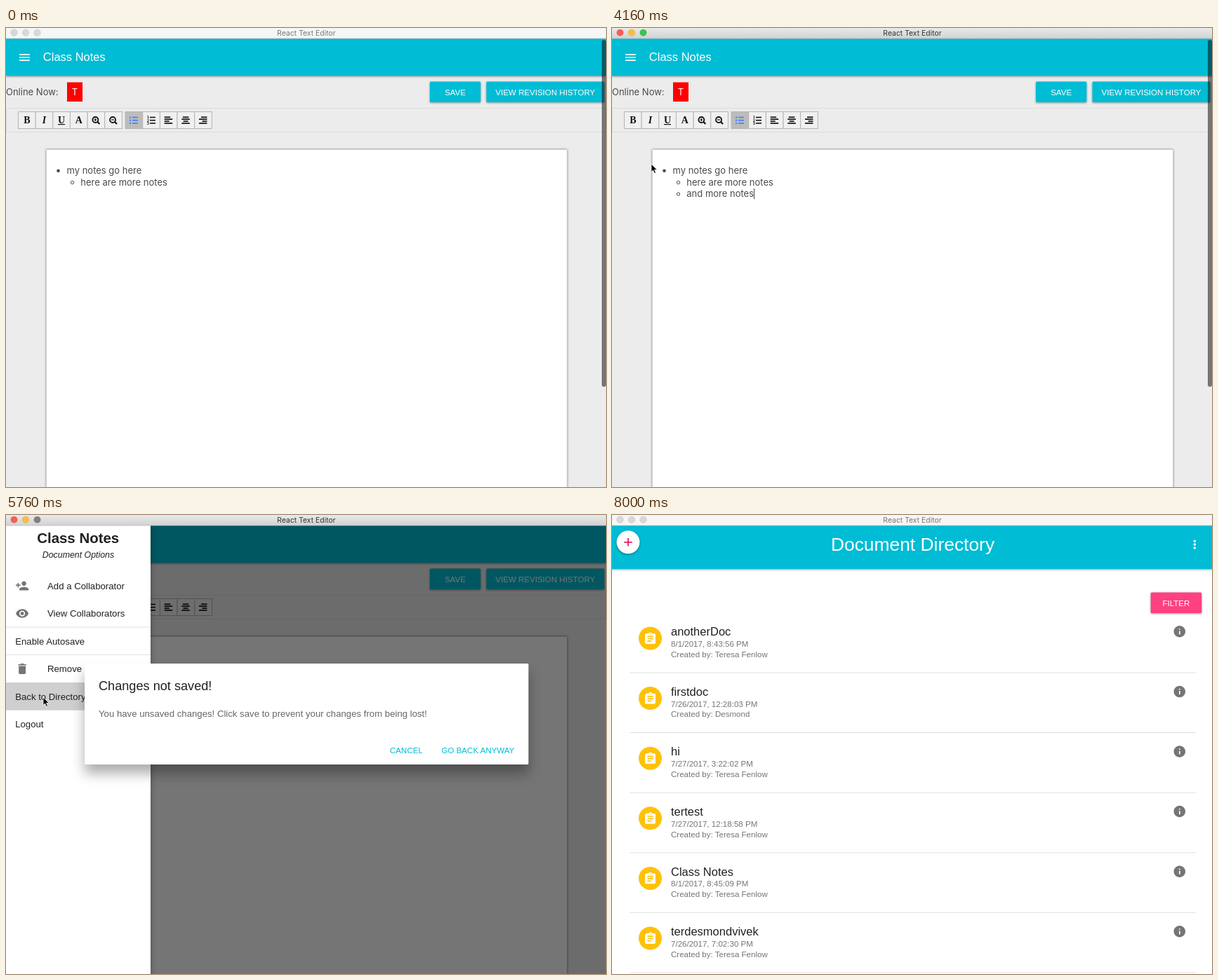
An HTML page for the animation above (8.08 s loop, 855 px wide and 655 px high).

```html
<!DOCTYPE html>
<html lang="en">
<head>
<meta charset="utf-8">
<title>Text Editor</title>
<style>
html, body { margin: 0; width: 100%; height: 100%; overflow: hidden; background: #ececec; }
svg { display: block; font-family: "Liberation Sans", Arial, sans-serif; }
text { white-space: pre; }
.ui { font-family: Inter, sans-serif; }
.serif { font-family: "Liberation Serif", "Noto Serif", serif; font-weight: bold; }
.mid { text-anchor: middle; }
.low { filter: drop-shadow(0 1px 1.5px rgba(0,0,0,.4)); }
.page { filter: drop-shadow(0 0 1.5px rgba(0,0,0,.65)); }
.side { filter: drop-shadow(0 2px 4px rgba(0,0,0,.35)); }
.high { filter: drop-shadow(0 13px 9px rgba(0,0,0,.32)); }
</style>
</head>
<body>
<svg id="stage" width="855" height="655" viewBox="0 0 855 655"></svg>
<script>
const LOOP = 8080, STEP = 80, CYAN = '#00bcd4', INK = '#212121';

const text = (x, y, size, fill, str, attrs = '') =>
  `<text x="${x}" y="${y}" font-size="${size}" fill="${fill}" ${attrs}>${str}</text>`;
const rect = (x, y, w, h, fill, attrs = '') =>
  `<rect x="${x}" y="${y}" width="${w}" height="${h}" fill="${fill}" ${attrs}/>`;
const circle = (x, y, r, fill, attrs = '') =>
  `<circle cx="${x}" cy="${y}" r="${r}" fill="${fill}" ${attrs}/>`;
const path = (d, attrs) => `<path d="${d}" ${attrs}/>`;
const icon = (cx, cy, d, fill) =>
  path(d, `fill="${fill}" transform="translate(${cx - 9.9} ${cy - 9.9}) scale(.825)"`);
const group = (id, body, attrs = '') => `<g id="${id}" ${attrs}>${body}</g>`;
const button = (x, y, w, fill, label) =>
  rect(x, y, w, 29.5, fill, 'rx="1.5" class="low"') +
  text(x + w / 2, y + 19, 11.55, '#fff', label, 'class="mid"');

const ICONS = {
  menu: 'M3 18h18v-2H3zM3 13h18v-2H3zM3 6v2h18V6z',
  addPerson: 'M15 12c2.21 0 4-1.79 4-4s-1.79-4-4-4-4 1.79-4 4 1.79 4 4 4zm-9-2V7H4v3H1v2h3v3h2v-3h3v-2H6zm9 4c-2.67 0-8 1.34-8 4v2h16v-2c0-2.66-5.33-4-8-4z',
  eye: 'M12 4.5C7 4.5 2.73 7.61 1 12c1.73 4.39 6 7.5 11 7.5s9.27-3.11 11-7.5c-1.73-4.39-6-7.5-11-7.5zM12 17c-2.76 0-5-2.24-5-5s2.24-5 5-5 5 2.24 5 5-2.24 5-5 5zm0-8c-1.66 0-3 1.34-3 3s1.34 3 3 3 3-1.34 3-3-1.34-3-3-3z',
  bin: 'M6 19c0 1.1.9 2 2 2h8c1.1 0 2-.9 2-2V7H6zM19 4h-3.5l-1-1h-5l-1 1H5v2h14z',
  clipboard: 'M19 3h-4.18C14.4 1.84 13.3 1 12 1c-1.3 0-2.4.84-2.82 2H5c-1.1 0-2 .9-2 2v14c0 1.1.9 2 2 2h14c1.1 0 2-.9 2-2V5c0-1.1-.9-2-2-2zm-7 0c.55 0 1 .45 1 1s-.45 1-1 1-1-.45-1-1 .45-1 1-1zm2 14H7v-2h7zm3-4H7v-2h10zm0-4H7V7h10z',
  info: 'M12 2C6.48 2 2 6.48 2 12s4.48 10 10 10 10-4.48 10-10S17.52 2 12 2zm1 15h-2v-6h2zm0-8h-2V7h2z'
};

function toolbar() {
  const slot = i => (i < 6 ? 17.5 : 22.2) + i * 24.65;
  let out = rect(.5, 114.5, 854, 34, '#ececec', 'stroke="#dcdcdc"');
  for (let i = 0; i < 11; i++)
    out += rect(slot(i), 119.5, 24.65, 24, i == 6 ? '#bcbcbc' : '#f0f0f0', 'stroke="#b4b4b4"');
  ['B', 'I', 'U', 'A'].forEach((c, i) => {
    const style = c == 'I' ? 'font-style="italic"' : '';
    out += text(slot(i) + 12.3, 136, 14, '#111', c, `class="serif mid" ${style}`);
  });
  out += rect(74, 137, 10, 1.2, '#111');
  [4, 5].forEach(i => {
    const x = slot(i) + 11.3;
    const sign = `M${x - 2} 131h4` + (i == 4 ? `M${x} 129v4` : '');
    out += circle(x, 131, 4, 'none', 'stroke="#111" stroke-width="1.8"') +
      path(`M${x + 3} 134l3 3`, 'stroke="#111" stroke-width="2.2"') +
      path(sign, 'stroke="#111" stroke-width="1.2"');
  });
  [127.5, 131.7, 135.9].forEach((y, i) => {
    out += rect(176, y - 1, 2.2, 2, '#3f82f7') + rect(180, y - .8, 8, 1.6, '#3f82f7') +
      text(201, y + 1.8, 5, '#111', i + 1, 'font-weight="bold"') + rect(205, y - .8, 8, 1.6, '#111');
  });
  [0, .5, 1].forEach((align, i) => [8.5, 11.5, 7, 11.5].forEach((w, row) => {
    out += rect(slot(8 + i) + 6.3 + (11.5 - w) * align, 126.4 + row * 2.9, w, 1.7, '#111');
  }));
  return out;
}

const note = (y, str, id = '') => text(106.3, y, 13, '#4a4a4a', str, `class="ui" ${id}`);
const ring = y => circle(94.5, y, 2.2, 'none', 'stroke="#4a4a4a"');

const editor = rect(0, 15, 855, 640, '#ececec') +
  rect(0, 15, 855, 53.3, CYAN, 'class="low"') +
  icon(26.4, 42, ICONS.menu, '#fff') + text(52.8, 47, 16.5, '#fff', 'Class Notes') +
  text(0, 96.3, 13, '#4a4a4a', 'Online Now:', 'class="ui"') +
  rect(87, 77.5, 22, 27.5, '#f00') + text(98, 96, 13, '#fff', 'T', 'class="ui mid"') +
  button(604, 76.5, 72.3, CYAN, 'SAVE') +
  button(684.5, 76.5, 168, CYAN, 'VIEW REVISION HISTORY') +
  toolbar() +
  rect(57.5, 173.5, 742, 500, '#fff', 'class="page"') +
  circle(74.5, 203.8, 2.3, '#4a4a4a') + text(86.5, 208, 13, '#4a4a4a', 'my notes go here', 'class="ui"') +
  ring(220.5) + note(224.6, 'here are more notes') +
  group('line3', ring(237) + note(241.1, '', 'id="typed"')) +
  rect(0, 0, 1, 15, '#444', 'id="caret"') +
  rect(849, 17, 6, 495, 'rgba(0,0,0,.5)', 'rx="3" id="scrollbar"');

const rule = y => rect(0, y - .5, 206, 1, '#e0e0e0');
const item = (x, y, str) => text(x, y + 4.5, 13.2, INK, str);
const drawer = rect(0, 0, 206, 660, '#fff', 'class="side"') +
  text(102.7, 39.7, 20.45, INK, 'Class Notes', 'class="mid" font-weight="bold"') +
  text(103, 61, 12.375, INK, 'Document Options', 'class="mid" font-style="italic"') +
  rect(0, 239, 206, 39.5, '#cfcfcf', 'id="hover"') +
  icon(23.1, 101, ICONS.addPerson, '#757575') + item(59, 101, 'Add a Collaborator') +
  icon(23.1, 140.5, ICONS.eye, '#757575') + item(59, 140.5, 'View Collaborators') + rule(160) +
  item(13.2, 180, 'Enable Autosave') + rule(199.5) +
  icon(23.1, 219.5, ICONS.bin, '#757575') + item(59, 219.5, 'Remove') +
  item(13.2, 259, 'Back to Directory') + rule(278.5) + item(13.2, 298.5, 'Logout');

const dialog = rect(112, 264, 632.5, 144, '#fff', 'rx="1.6" class="high"') +
  text(132, 302, 18.15, INK, 'Changes not saved!') +
  text(132, 340, 13.2, '#666', 'You have unsaved changes! Click save to prevent your changes from being lost!') +
  group('press', rect(607, 372, 131, 29.5, '#ebebeb', 'rx="1.5"') +
    circle(640, 387, 0, '#cdcdcd', 'id="ripple" clip-path="url(#pressClip)"')) +
  text(547, 391.8, 11.55, CYAN, 'CANCEL') + text(620.5, 391.8, 11.55, CYAN, 'GO BACK ANYWAY');

const DOCS = [
  ['anotherDoc', '8/1/2017, 8:43:56 PM'],
  ['firstdoc', '7/26/2017, 12:28:03 PM', 'Desmond'],
  ['hi', '7/27/2017, 3:22:02 PM'],
  ['tertest', '7/27/2017, 12:18:58 PM'],
  ['Class Notes', '8/1/2017, 8:45:09 PM'],
  ['terdesmondvivek', '7/26/2017, 7:02:30 PM']
];
const docRow = ([name, date, author = 'Teresa Fenlow'], i) =>
  `<g transform="translate(0 ${i * 85.6})">` +
  circle(54.5, 176, 16.5, '#ffc107') + icon(54.5, 176.5, ICONS.clipboard, '#fff') +
  text(84, 172.3, 16.5, INK, name) + text(84, 188, 11.55, '#757575', date) +
  text(84, 202.8, 11.55, '#757575', 'Created by: ' + author) +
  icon(808.8, 166.3, ICONS.info, '#757575') + rect(25, 224.5, 807, 1, '#e0e0e0') + '</g>';

const directory = rect(0, 15, 855, 640, '#fff') +
  rect(0, 15, 855, 62, CYAN, 'class="low"') +
  text(428.5, 51.3, 26.4, '#fff', 'Document Directory', 'class="mid"') +
  circle(23, 38.8, 16.5, '#fff', 'class="low"') +
  group('listing', path('M17.2 38.8h11.6M23 33v11.6', 'stroke="#e91e63" stroke-width="1.8"') +
    [37.2, 42.1, 47].map(y => circle(830.3, y, 1.8, '#fff')).join('') +
    button(767.7, 110.5, 72.5, '#ff4081', 'FILTER') + DOCS.map(docRow).join(''));

const titleBar = rect(0, 0, 855, 15, '#f6f6f6', 'id="bar"') + rect(0, 14.6, 855, .8, '#b8b8b8') +
  [11.5, 28, 44.5].map(x => circle(x, 6.7, 4.8, '#d8d8d8', 'class="light" stroke="#0002" stroke-width=".6"')).join('') +
  text(428, 10.6, 10.4, '#777', 'React Text Editor', 'class="ui mid" id="title"');

const beam = path('M-3-7q3 0 3 2q0-2 3-2M0-5V5M-3 7q3 0 3-2q0 2 3 2M-1.5 2h3', 'fill="none" stroke="#333" stroke-width="1.1"');
const arrow = path('M0 0V11.5l2.6-2.4 1.9 4.2 2-.9-1.9-4.1H8.2z', 'fill="#000" stroke="#fff" stroke-width=".8"');

const $ = id => document.getElementById(id);
$('stage').innerHTML =
  `<defs><linearGradient id="metal" x2="0" y2="1"><stop stop-color="#e9e9e9"/><stop offset="1" stop-color="#d2d2d2"/></linearGradient>
  <clipPath id="pressClip">${rect(607, 372, 131, 29.5, '#000')}</clipPath></defs>` +
  group('editor', editor) + rect(0, 0, 855, 655, '#000', 'id="shade"') +
  group('drawer', drawer) + rect(0, 0, 855, 655, '#000', 'id="veil"') +
  group('dialog', dialog) + group('directory', directory) + titleBar +
  group('beam', beam) + group('arrow', arrow);
const lights = [...document.querySelectorAll('.light')];

const clamp = v => Math.max(0, Math.min(1, v));

// cubic-bezier(.23, 1, .32, 1)
function ease(v) {
  const x = clamp(v);
  let lo = 0, hi = 1;
  for (let i = 0; i < 24; i++) {
    const s = (lo + hi) / 2, r = 1 - s;
    if (3 * r * r * s * .23 + 3 * r * s * s * .32 + s ** 3 < x) lo = s; else hi = s;
  }
  return 1 - (1 - lo) ** 3;
}

// [time, x, y]
const POINTER = [
  [160, 350, 668], [720, 261, 219], [2640, 261, 219], [2720, 239, 227], [3040, 122, 232],
  [4080, 74, 221], [4160, 56, 194], [4480, 26, 78], [4560, 26, 78], [4800, 21, 38],
  [5360, 21, 38], [5600, 53, 260], [5840, 53, 260], [6240, 638.5, 386], [7120, 638.5, 386],
  [7680, 560, 668]
];
function pointerAt(t) {
  const k = POINTER.findIndex(p => p[0] > t);
  if (k < 1) return POINTER[k < 0 ? POINTER.length - 1 : 0].slice(1);
  const [a, b] = [POINTER[k - 1], POINTER[k]], f = (t - a[0]) / (b[0] - a[0]);
  return [a[1] + (b[1] - a[1]) * f, a[2] + (b[2] - a[2]) * f];
}

function typedAt(t) {
  const keys = from => Math.max(0, Math.floor((t - from) / STEP) + 1);
  if (t >= 3760) return 'and more notes'.slice(0, 11 + Math.min(3, keys(3840)));
  let n = Math.min(5, keys(1440));
  if (t >= 1920) n = 8 + Math.min(6, keys(2080));
  if (t >= 3440) n = 13 - Math.min(2, keys(3600));
  return 'and more nores'.slice(0, n);
}

function lightsAt(t, active) {
  if (!active) return ['#d8d8d8', '#d8d8d8', '#d8d8d8'];
  const off = t >= 6400 && t < 6480 ? [0] : t >= 5520 && t < 6400 ? [2] : t >= 5040 && t < 5520 ? [0, 1] : [];
  return ['#fc5b57', '#fdbc40', '#34c84a'].map((c, i) => off.includes(i) ? '#808080' : c);
}

const show = (id, on) => $(id).style.display = on ? '' : 'none';
const move = (id, x, y) => $(id).setAttribute('transform', `translate(${x} ${y})`);

function draw(t) {
  const inside = (a, b) => t >= a && t < b;
  const active = inside(640, 7840);
  $('bar').setAttribute('fill', active ? 'url(#metal)' : '#f6f6f6');
  $('title').setAttribute('fill', active ? '#333' : '#777');
  lightsAt(t, active).forEach((c, i) => lights[i].setAttribute('fill', c));

  show('line3', t >= 1200);
  $('typed').textContent = typedAt(t);
  show('caret', inside(720, 3040) || inside(3440, 4480));
  move('caret', t < 1200 ? 231 : 106.3 + $('typed').getComputedTextLength(), t < 1200 ? 212 : 229);
  show('scrollbar', t < 5040);

  move('drawer', -206 * (1 - ease((t - 5024) / 450)), 0);
  show('drawer', t > 5024);
  $('shade').setAttribute('opacity', .54 * ease((t - 5024) / 400));
  show('hover', inside(5600, 5920));

  $('veil').setAttribute('opacity', .54 * ease((t - 5760) / 400));
  show('dialog', t > 5740);
  move('dialog', 0, -64 * (1 - ease((t - 5740) / 450)));
  show('press', t >= 6240);
  $('ripple').setAttribute('r', 53 * clamp((t - 6240) / 160));

  show('directory', t >= 6480);
  show('listing', t >= 6640);

  const [x, y] = pointerAt(t);
  move('beam', x, y);
  move('arrow', x, y);
  show('beam', inside(160, 1040) || inside(2720, 3040));
  show('arrow', inside(4080, 7680));
}

const start = performance.now();
function tick() {
  const t = (performance.now() - start) % LOOP;
  draw(Math.floor(t / STEP) * STEP);
  requestAnimationFrame(tick);
}
tick();
</script>
</body>
</html>
```
